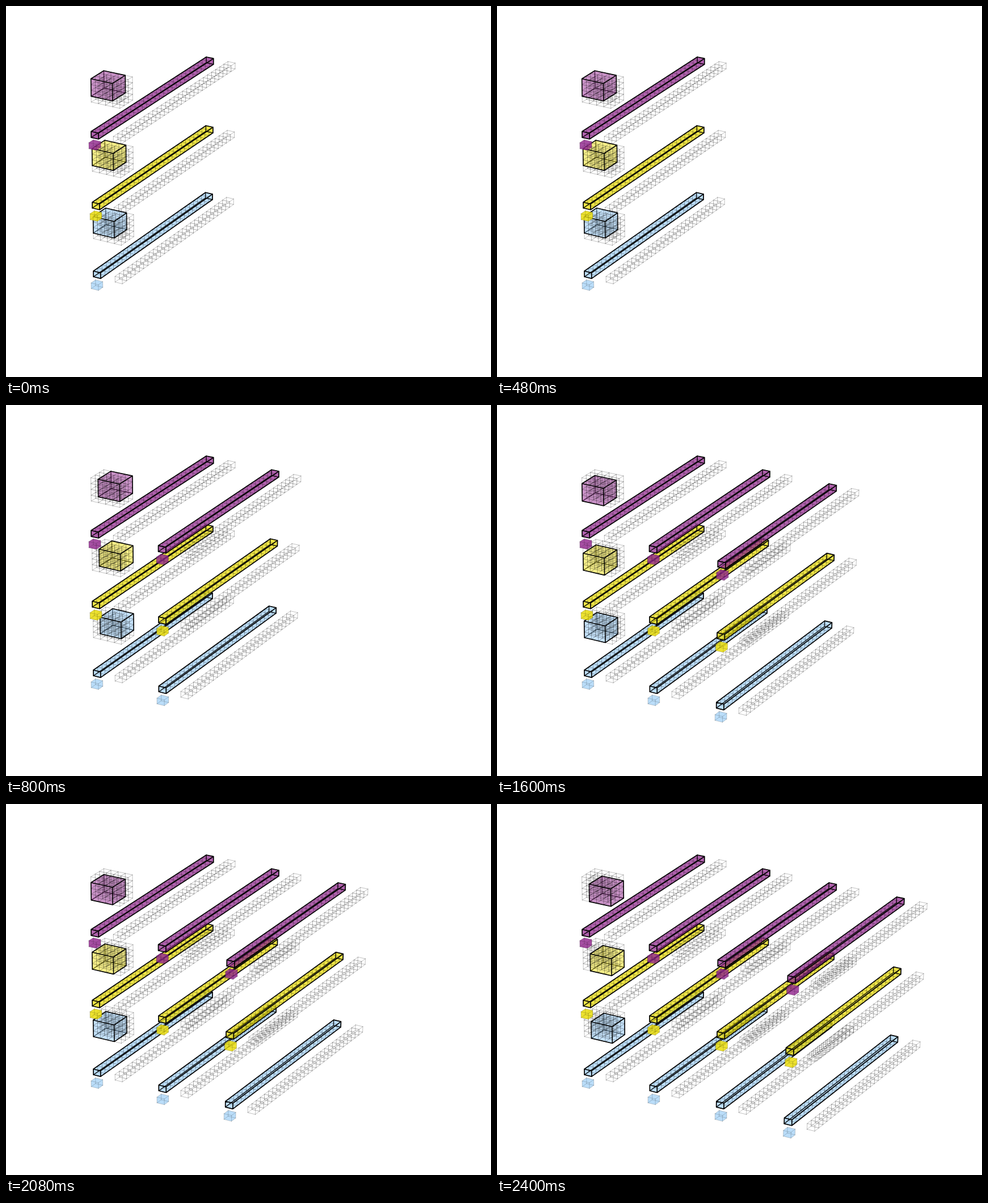
Recreate the animation shown at these times as an HTML page. Size 855 by 655 pixels, loop 3.2 s.

```html
<!DOCTYPE html>
<html lang="en">
<head>
<meta charset="utf-8">
<title>Convolution unrolled</title>
<style>
  html, body { margin: 0; width: 100%; height: 100%; overflow: hidden; background: #fff; }
  svg { display: block; width: 855px; height: 655px; }
  path { stroke-linejoin: round; stroke-linecap: round; }
</style>
</head>
<body>
<svg id="stage" viewBox="0 0 855 655"></svg>
<script>
const stage = document.getElementById('stage');
const STEP = 800, STEPS = 4, CELLS = 27;

// drawn from the lowest channel to the highest
const channels = [
  { level: 2, color: 'rgb(140,198,245)', cube: .5, bar: .58, out: .6 },
  { level: 1, color: 'rgb(235,222,18)', cube: .5, bar: .78, out: .88 },
  { level: 0, color: 'rgb(147,39,143)', cube: .5, bar: .73, out: .82 }
];

// perspective camera: x runs right, y down, z away from the viewer
function project([x, y, z]) {
  const w = 1 - .00105 * x + .001163 * y + .001735 * z;
  const u = 150 + 12.888 * x + .346 * y + 8.1357 * z;
  const v = 221.5 + 2.7 * x + 10.817 * y - 4.713 * z;
  return (u / w).toFixed(2) + ' ' + (v / w).toFixed(2);
}

const add = (a, b) => a.map((n, i) => n + b[i]);
const line = (...points) => 'M' + points.map(project).join('L');

function stroke(d, width, opacity) {
  return `<path d="${d}" fill="none" stroke="#000" stroke-width="${width}" stroke-opacity="${opacity}"/>`;
}

// lattice of unit cells; edges shared by more cells are darker
function lattice(at, size, opacity = .42) {
  const groups = { 1: '', 2: '', 4: '' };
  for (let axis = 0; axis < 3; axis++) {
    const b = (axis + 1) % 3, c = (axis + 2) % 3;
    for (let i = 0; i <= size[b]; i++) {
      for (let j = 0; j <= size[c]; j++) {
        const from = [0, 0, 0];
        from[b] = i;
        from[c] = j;
        const to = from.slice();
        to[axis] = size[axis];
        const inner = (n, max) => n > 0 && n < max ? 2 : 1;
        const shared = inner(i, size[b]) * inner(j, size[c]);
        groups[shared] += line(add(at, from), add(at, to));
      }
    }
  }
  return Object.entries(groups).map(([n, d]) =>
    d && stroke(d, .6, 1 - (1 - opacity) ** Math.sqrt(n))).join('');
}

function corners(at, [w, h, d]) {
  return (x, y, z) => add(at, [x * w, y * h, z * d]);
}

function fill(at, size, color, opacity) {
  const p = corners(at, size);
  const d = line(p(0, 0, 0), p(0, 0, 1), p(1, 0, 1), p(1, 1, 1), p(1, 1, 0), p(0, 1, 0)) + 'Z';
  return `<path d="${d}" fill="${color}" fill-opacity="${opacity}"/>`;
}

function hiddenEdges(at, size, width, opacity) {
  const p = corners(at, size), back = p(0, 1, 1);
  return stroke(line(back, p(0, 0, 1)) + line(back, p(0, 1, 0)) + line(back, p(1, 1, 1)), width, opacity);
}

function frontEdges(at, size, width, opacity) {
  const p = corners(at, size), near = p(1, 0, 0);
  const rim = line(p(0, 0, 0), p(0, 0, 1), p(1, 0, 1), p(1, 1, 1), p(1, 1, 0), p(0, 1, 0)) + 'Z';
  return stroke(rim + line(near, p(0, 0, 0)) + line(near, p(1, 0, 1)) + line(near, p(1, 1, 0)), width, opacity);
}

function volume({ level, color, cube }, step) {
  const at = [-8.47, 12.1 * level, 13.98], size = [3, 3, 3];
  const kernel = add(at, [step % 2, step >> 1, 0]);
  return hiddenEdges(kernel, size, 1.5, .8) + fill(kernel, size, color, cube) +
    lattice(at, [4, 4, 3]) + frontEdges(kernel, size, 1.6, 1);
}

function column({ level, color, bar, out }, step) {
  const size = [1, 1, CELLS], unit = [1, 1, 1];
  const at = [9 * step, 12 * level, 0];
  const result = add(at, [1.5, 0, -3]);
  return lattice(add(at, [3, 0, 0]), size) +
    fill(at, size, color, bar) + lattice(at, size) +
    hiddenEdges(at, size, 1.5, .85) + frontEdges(at, size, 1.7, 1) +
    fill(result, unit, color, out) + lattice(result, unit, .3);
}

function draw(step) {
  let html = '';
  for (const channel of channels) {
    html += volume(channel, step);
    for (let s = 0; s <= step; s++) html += column(channel, s);
  }
  stage.innerHTML = html;
}

let shown = -1;
function tick() {
  const step = Math.floor(performance.now() / STEP) % STEPS;
  if (step !== shown) draw(shown = step);
  requestAnimationFrame(tick);
}
tick();
</script>
</body>
</html>
```
